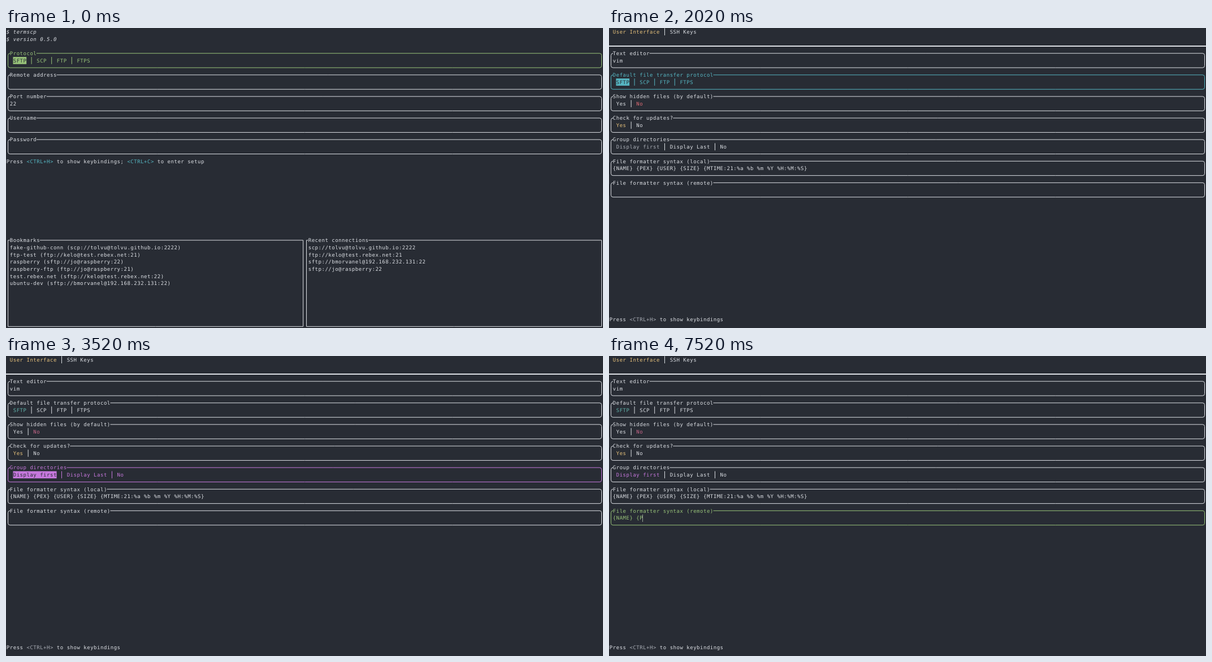
Animation of 1056x530 px, one loop 8000 ms. Source, as an HTML page with a canvas:

```html
<!DOCTYPE html>
<html lang="en">
<head>
<meta charset="utf-8">
<title>Terminal setup</title>
<style>
  html, body { margin: 0; width: 100%; height: 100%; overflow: hidden; background: #282c34; }
  canvas { display: block; }
</style>
</head>
<body>
<canvas id="term" width="1056" height="530"></canvas>
<script>
const ctx = document.getElementById('term').getContext('2d');
ctx.textAlign = 'center';
ctx.textRendering = 'geometricPrecision';

const BG = '#282c34', FG = '#dcdfe4', GREEN = '#98c379', CYAN = '#56b6c2',
      TEAL = '#62b3ab', RED = '#e06c75', ROSE = '#c9678a', MAGENTA = '#c678dd',
      YELLOW = '#e5c07b', GRAY = '#a9adb5', CARET = '#9aa596';

// Terminal grid
const CW = 5.932, RH = 12.7, LAST = 177;
const FONT = '9px "DejaVu Sans Mono", "Noto Sans Mono", monospace';
const colX = c => 0.6 + c * CW;
const rowY = r => 0.3 + r * RH;
const midX = c => colX(c + 0.5);
const midY = r => rowY(r + 0.5);

function text(col, row, str, color = FG, italic = false) {
  ctx.font = (italic ? 'italic ' : '') + FONT;
  ctx.fillStyle = color;
  [...str].forEach((ch, i) => {
    if (ch !== ' ') ctx.fillText(ch, midX(col + i), rowY(row) + 9.6);
  });
  return col + str.length;
}

function spans(col, row, parts) {
  for (const [str, color] of parts) col = text(col, row, str, color);
}

function box(c0, r0, c1, r1, title, color = FG, radius = 3.5) {
  const l = midX(c0), r = midX(c1), t = midY(r0), b = midY(r1);
  ctx.strokeStyle = color;
  ctx.lineWidth = 1;
  ctx.beginPath();
  ctx.moveTo(colX(c0 + 1 + title.length), t);
  ctx.arcTo(r, t, r, b, radius);
  ctx.arcTo(r, b, l, b, radius);
  ctx.arcTo(l, b, l, t, radius);
  ctx.arcTo(l, t, r, t, radius);
  ctx.lineTo(colX(c0 + 1), t);
  ctx.stroke();
  text(c0 + 1, r0, title, color);
}

function caret(col, row) {
  ctx.fillStyle = CARET;
  ctx.fillRect(Math.floor(colX(col)), Math.round(rowY(row)), 1, 13);
}

function tabs(col, row, items, picked, accent, focused = false) {
  const base = focused ? accent : FG;
  items.forEach((item, i) => {
    if (i) {
      ctx.fillStyle = base;
      ctx.fillRect(midX(col + 1) - 0.5, rowY(row), 1, RH);
      col += 3;
    }
    const on = i === picked;
    if (on && focused) {
      ctx.fillStyle = accent;
      ctx.fillRect(colX(col), rowY(row), item.length * CW, RH);
    }
    col = text(col, row, item, on ? (focused ? BG : accent) : base);
  });
}

function input(row, title, value = '', color = FG) {
  box(0, row, LAST, row + 2, title, color);
  text(1, row + 1, value, color);
}

function radio(row, title, items, picked, accent, focused = false) {
  box(0, row, LAST, row + 2, title, focused ? accent : FG);
  tabs(2, row + 1, items, picked, accent, focused);
}

function list(c0, c1, title, items) {
  box(c0, 29, c1, 41, title, FG, 0);
  items.forEach((item, i) => text(c0 + 1, 30 + i, item));
}

const PROTOCOLS = ['SFTP', 'SCP', 'FTP', 'FTPS'];
const YES_NO = ['Yes', 'No'];

function drawLogin() {
  text(0, 0, '$ termscp', FG, true);
  text(0, 1, '$ version 0.5.0', FG, true);
  radio(3, 'Protocol', PROTOCOLS, 0, GREEN, true);
  input(6, 'Remote address');
  input(9, 'Port number', '22');
  input(12, 'Username');
  input(15, 'Password');
  spans(0, 18, [
    ['Press ', FG], ['<CTRL+H>', CYAN], [' to show keybindings; ', FG],
    ['<CTRL+C>', CYAN], [' to enter setup', FG]
  ]);
  list(0, 88, 'Bookmarks', [
    'fake-github-conn (scp://tolvu@tolvu.github.io:2222)',
    'ftp-test (ftp://kelo@test.rebex.net:21)',
    'raspberry (sftp://jo@raspberry:22)',
    'raspberry-ftp (ftp://jo@raspberry:21)',
    'test.rebex.net (sftp://kelo@test.rebex.net:22)',
    'ubuntu-dev (sftp://bmorvanel@192.168.232.131:22)'
  ]);
  list(89, LAST, 'Recent connections', [
    'scp://tolvu@tolvu.github.io:2222',
    'ftp://kelo@test.rebex.net:21',
    'sftp://bmorvanel@192.168.232.131:22',
    'sftp://jo@raspberry:22'
  ]);
}

function drawSetup({ focus, typed = '', blink = false }) {
  const at = name => focus === name;
  const late = at('group') || at('remote');

  tabs(1, 0, ['User Interface', 'SSH Keys'], 0, YELLOW);
  ctx.fillStyle = FG;
  ctx.fillRect(0, 31, 1056, 2);

  input(3, 'Text editor', 'vim', at('editor') ? GREEN : FG);
  if (at('editor') && blink) caret(4, 4);

  const protocol = at('protocol') ? CYAN : at('editor') ? GRAY : TEAL;
  radio(6, 'Default file transfer protocol', PROTOCOLS, 0, protocol, at('protocol'));
  radio(9, 'Show hidden files (by default)', YES_NO, 1, late ? ROSE : RED, at('hidden'));
  radio(12, 'Check for updates?', YES_NO, 0, YELLOW);
  radio(15, 'Group directories', ['Display first', 'Display Last', 'No'], 0,
        late ? MAGENTA : GRAY, at('group'));
  input(18, 'File formatter syntax (local)',
        '{NAME} {PEX} {USER} {SIZE} {MTIME:21:%a %b %m %Y %H:%M:%S}');

  input(21, 'File formatter syntax (remote)', typed, at('remote') ? GREEN : FG);
  if (at('remote')) caret(1 + typed.length, 22);

  spans(0, 40, [['Press ', FG], ['<CTRL+H>', GRAY], [' to show keybindings', FG]]);
}

const typing = n => ({ focus: 'remote', typed: '{NAME} {P'.slice(0, n) });

// [start in ms, setup state]; no state means the login screen
const STEPS = [
  [0, null],
  [500, { focus: 'editor', blink: true }],
  [1000, { focus: 'editor' }],
  [1520, { focus: 'editor', blink: true }],
  [2020, { focus: 'protocol' }],
  [3020, { focus: 'hidden' }],
  [3520, { focus: 'group' }],
  [4520, typing(0)],
  [5020, typing(1)],
  [6020, typing(3)],
  [6520, typing(5)],
  [7020, typing(7)],
  [7520, typing(9)]
];
const LOOP = 8000;
const start = performance.now();
let shown = null;

function tick() {
  const t = (performance.now() - start) % LOOP;
  const step = STEPS.filter(s => s[0] <= t).pop();
  if (step !== shown) {
    shown = step;
    ctx.fillStyle = BG;
    ctx.fillRect(0, 0, 1056, 530);
    if (step[1]) drawSetup(step[1]);
    else drawLogin();
  }
  requestAnimationFrame(tick);
}
tick();
</script>
</body>
</html>
```
